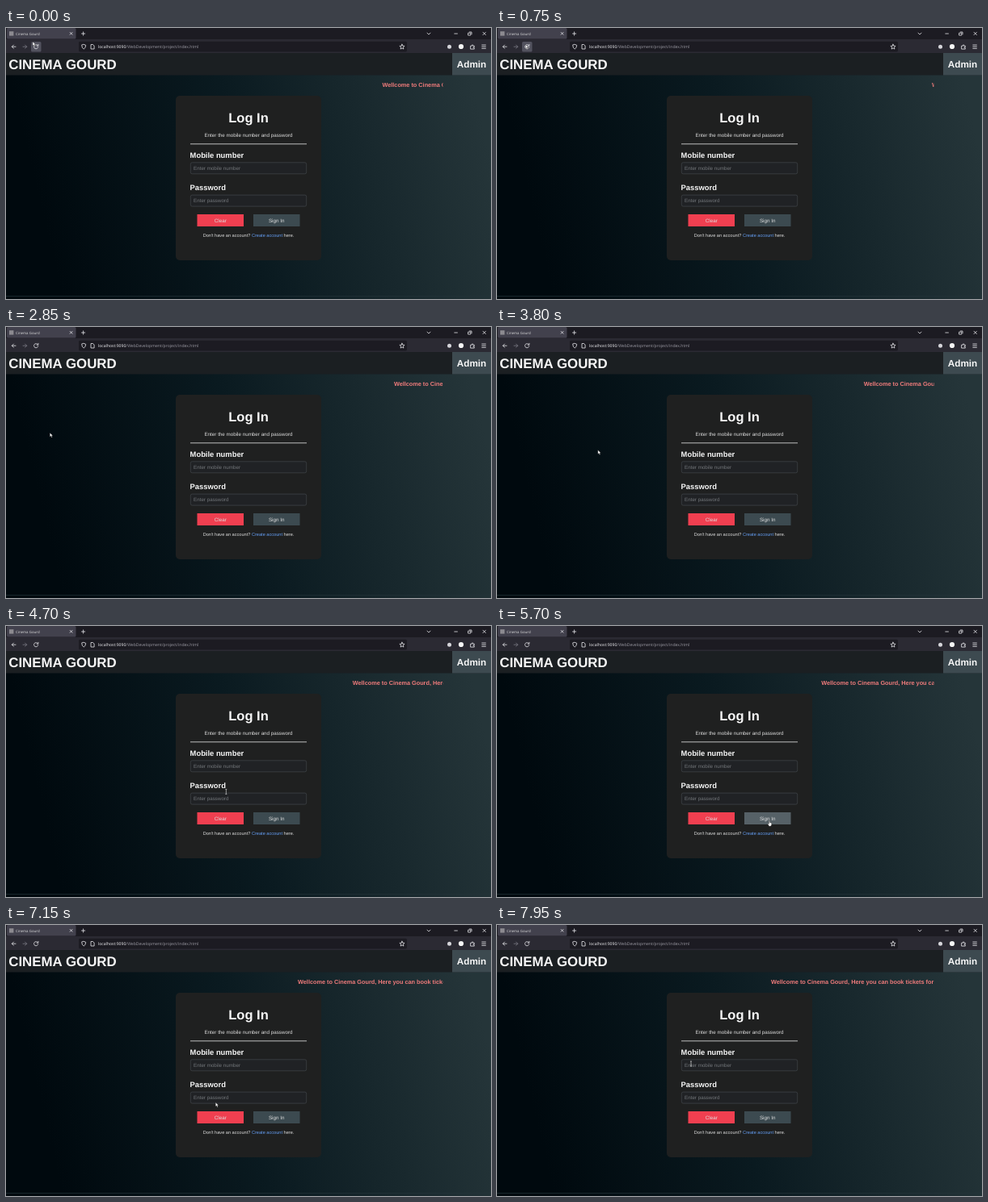
Recreate the animation shown at these times as an HTML page. Size 600 by 336 pixels, loop 8000 ms.

```html
<!DOCTYPE html>
<html lang="en">
<head>
<meta charset="utf-8">
<title>Log In</title>
<style>
html, body { margin: 0; width: 100%; height: 100%; overflow: hidden; background: #02090d; }
svg { display: block; width: 600px; height: 336px; text-rendering: geometricPrecision; }
text { font-family: "Liberation Sans", Arial, sans-serif; font-size: 6.25px; fill: #dedede; }
.ui { font-family: "Open Sans", sans-serif; }
.bold { font-weight: bold; fill: #f6f6f6; }
.mid { text-anchor: middle; }
.hint { fill: #73777b; }
.icon { fill: none; stroke: #e6e6ea; stroke-width: .8; stroke-linecap: round; stroke-linejoin: round; }
.field { fill: #202225; stroke: #43474b; stroke-width: .7; }
</style>
</head>
<body>
<svg viewBox="0 0 600 336">
  <defs>
    <linearGradient id="night" gradientUnits="userSpaceOnUse" x1="50" y1="250" x2="590" y2="120">
      <stop offset="0" stop-color="#00090e"/>
      <stop offset=".45" stop-color="#0a1a20"/>
      <stop offset="1" stop-color="#253539"/>
    </linearGradient>
    <clipPath id="lane"><rect x="60" y="60" width="480.5" height="20"/></clipPath>
  </defs>

  <!-- page -->
  <rect width="600" height="336" fill="url(#night)"/>
  <rect y="332" width="600" height="1" fill="#24343a" opacity=".7"/>
  <rect y="31" width="600" height="27.5" fill="#1b1f22"/>
  <rect x="552" y="31" width="48" height="27.5" fill="#3d4a50"/>
  <text class="bold" x="3.2" y="51" style="font-size:16.9px">CINEMA GOURD</text>
  <text class="bold mid" x="576" y="49" style="font-size:11.7px">Admin</text>
  <g clip-path="url(#lane)">
    <text id="marquee" class="bold" y="73.3" style="font-size:7.3px;fill:#ef7b7b">Wellcome to Cinema Gourd, Here you can book tickets for your</text>
  </g>

  <!-- form -->
  <rect x="210" y="84" width="180" height="204" rx="5" fill="#1f2020"/>
  <text class="bold mid" x="300" y="117.3" style="font-size:16.5px">Log In</text>
  <text class="mid" x="300" y="134.6">Enter the mobile number and password</text>
  <rect x="228" y="143.3" width="144" height="1" fill="#bdbdbd"/>
  <text class="bold" x="227.6" y="160.8" style="font-size:9.4px">Mobile number</text>
  <rect class="field" x="228.3" y="166.8" width="143.4" height="14" rx="2"/>
  <text class="hint" x="232" y="176">Enter mobile number</text>
  <text class="bold" x="227.6" y="201.2" style="font-size:9.4px">Password</text>
  <rect class="field" x="228.3" y="207.1" width="143.4" height="14" rx="2"/>
  <text class="hint" x="232" y="216.2">Enter password</text>
  <rect x="236.5" y="231" width="57.5" height="15" fill="#f03f50"/>
  <text class="mid" x="265.3" y="240.8">Clear</text>
  <rect id="signIn" x="306" y="231" width="57.5" height="15"/>
  <text class="mid" x="334.7" y="240.8">Sign In</text>
  <text class="mid" x="300" y="259" style="font-size:5.62px">Don't have an account? <tspan id="link" fill="#659ff5">Create account</tspan> here.</text>

  <!-- browser -->
  <rect width="600" height="14" fill="#1c1b22"/>
  <rect x="1" width="85.5" height="13.5" rx="1.5" fill="#42414d"/>
  <rect y="14" width="600" height="17" fill="#2b2a33"/>
  <rect x="90" y="16.8" width="406" height="12.6" rx="1.6" fill="#1c1b22"/>
  <rect x="4" y="4.2" width="5.4" height="5.4" fill="#8c8a90"/>
  <text class="ui" x="12" y="8.7" style="font-size:4.4px">Cinema Gourd</text>
  <rect id="reloadHover" x="31" y="17" width="12.5" height="12.5" rx="1.5" fill="#52525e"/>
  <text class="ui" x="114" y="25.1" style="font-size:5.1px;fill:#f3f3f6">localhost:9090<tspan fill="#9b9aa3">/WebDevelopment/project/index.html</tspan></text>
  <g class="icon">
    <path d="M79.2 5.4l2.8 2.8m0-2.8l-2.8 2.8M93.5 7h4.2M95.6 4.9v4.2"/>
    <path d="M12 23.2H7.3m2.1-2.1l-2.1 2.1l2.1 2.1"/>
    <path stroke="#7d7c86" d="M21 23.2h4.7m-2.1-2.1l2.1 2.1l-2.1 2.1"/>
    <path d="M39.3 21.7A2.6 2.6 0 1 0 39.7 23.8M39.9 20.3v1.8h-1.8"/>
    <path d="M96.2 20.4l2.5.9q0 3.6-2.5 4.8q-2.5-1.2-2.5-4.8z"/>
    <path d="M105.4 20.5h2.2l1.5 1.5v4h-3.7z"/>
    <path d="M490 20.2l.9 2l2.2.2l-1.7 1.5l.5 2.2l-1.9-1.2l-1.9 1.2l.5-2.2l-1.7-1.5l2.2-.2z"/>
    <path d="M521 6.1l2 2l2-2M554.8 7h3.6M590 5.2l3.4 3.4m0-3.4l-3.4 3.4"/>
    <path d="M572 6.2h2.8v2.8H572zM573.2 5h2.8v2.8"/>
    <path d="M575 22.2h1.4v-1.1h1.4v1.1h1.5v1.5h-1v1h1v1.4H575z"/>
    <path d="M588.8 21h4.6m-4.6 2.2h4.6m-4.6 2.2h4.6"/>
  </g>
  <circle cx="548.5" cy="23.2" r="2.5" fill="#d5d5da"/>
  <circle cx="563" cy="23" r="3.1" fill="#f5f5f5"/>

  <g id="status">
    <rect x="-.5" y="327.5" width="125.5" height="9" fill="#2b2a33" stroke="#55545e" stroke-width=".6"/>
    <text class="ui" x="1" y="333.4" style="font-size:4.45px;fill:#f0f0f4">localhost:9090/WebDevelopment/project/registration.html</text>
  </g>

  <g id="cursor">
    <path id="arrow" d="M0 0v5l1.2-1.1l.9 2l.9-.4l-.9-1.9h1.6z" fill="#fff" stroke="#000" stroke-width=".3"/>
    <path id="beam" d="M-1 -3h2M0 -3v6M-1 3h2" fill="none" stroke="#d8d8d8" stroke-width=".65"/>
    <path id="hand" d="M-.6 .3q.6-.7 1.1 0v2.2l2.2.5v2q-.2 1.7-1.5 2h-1.5l-1.8-2.7l.3-.7l1.2.8z" fill="#fff" stroke="#000" stroke-width=".3"/>
  </g>
</svg>
<script>
const LOOP = 8000;
const SPEED = 0.02764;
const RELOAD = 677;
const $ = id => document.getElementById(id);

// time, x, y, pointer shape from here on
const path = [
  [0, 33, 17, "arrow"], [500, 34, 18, "arrow"], [900, 36, 22, "arrow"],
  [1550, 50, 122.5, "arrow"], [1750, 50, 123, "arrow"], [2500, 54.3, 131.2, "arrow"],
  [3450, 54.3, 131.2, "arrow"], [4250, 215, 180, "beam"], [4700, 272.3, 205.3, "beam"],
  [4950, 282, 238, "hand"], [5150, 290, 241, "arrow"], [5350, 325, 242, "hand"],
  [5700, 337, 241.2, "hand"], [5950, 338, 249, "arrow"], [6100, 333, 255, "hand"],
  [6380, 313, 250.5, "arrow"], [6400, 312, 250, "arrow"], [6800, 290, 235, "arrow"],
  [7200, 255, 218, "beam"], [7700, 246, 212, "beam"], [7950, 240, 172, "beam"], [LOOP, 240, 172, "beam"]
];

const show = (id, on) => $(id).setAttribute("visibility", on ? "visible" : "hidden");
const within = (t, from, to) => t >= from && t < to;

function pointerAt(t) {
  const i = path.findIndex((p, n) => n + 1 === path.length - 1 || t < path[n + 1][0]);
  const [t0, x0, y0, shape] = path[i], [t1, x1, y1] = path[i + 1];
  const k = (t - t0) / (t1 - t0);
  return { x: x0 + (x1 - x0) * k, y: y0 + (y1 - y0) * k, shape };
}

function draw(t) {
  const x = t < RELOAD ? 465.5 - SPEED * t : 540 - SPEED * (t - RELOAD);
  $("marquee").setAttribute("x", x);

  const p = pointerAt(t);
  $("cursor").setAttribute("transform", `translate(${p.x} ${p.y})`);
  for (const shape of ["arrow", "beam", "hand"]) show(shape, shape === p.shape);

  show("reloadHover", t < 950);
  show("status", within(t, 6100, 6900));
  $("signIn").setAttribute("fill", within(t, 5300, 5950) ? "#566167" : "#3c4a50");
  $("link").setAttribute("text-decoration", within(t, 6100, 6450) ? "underline" : "none");
}

const start = performance.now();
function tick() {
  draw((performance.now() - start) % LOOP);
  requestAnimationFrame(tick);
}
tick();
</script>
</body>
</html>
```
